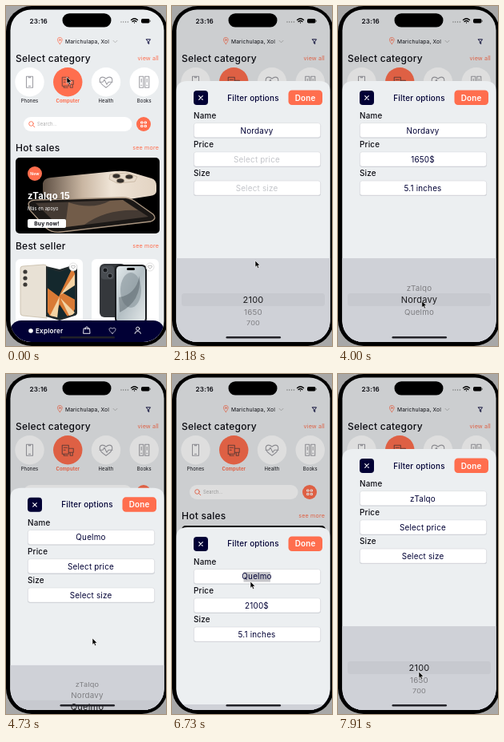
An HTML page that plays this animation: 200 by 426 pixels, repeating every 8000 ms.

```html
<!DOCTYPE html>
<html lang="en">
<head>
<meta charset="utf-8">
<title>Shop filter</title>
<style>
  html, body { margin: 0; width: 100%; height: 100%; overflow: hidden; background: #a8a8a8; }
  svg { display: block; width: 100%; height: 100%; }
  text { font-family: Inter, Roboto, sans-serif; fill: #0b0b12; letter-spacing: .02em; }
  .mid { text-anchor: middle; }
  .end { text-anchor: end; }
  .head { font-size: 12px; font-weight: 500; }
  .link { font-size: 7.2px; fill: #ff6e4e; }
  .cat { font-size: 5.9px; }
  .field { font-size: 9.9px; fill: #010035; }
  .label { font-size: 9.9px; font-weight: 500; }
  .line { fill: none; stroke-linecap: round; stroke-linejoin: round; }
</style>
</head>
<body>
<svg viewBox="0 0 200 426" preserveAspectRatio="none">
  <defs>
    <clipPath id="screen"><rect x="5.500" y="4.500" width="192" height="416.500" rx="26"/></clipPath>
    <clipPath id="banner"><rect x="12" y="190" width="180" height="95" rx="5"/></clipPath>
    <clipPath id="unfolded"><path d="M52 329l15 4v58l-15-4zM67 333l19-6v59l-19 5z"/></clipPath>
    <linearGradient id="gold">
      <stop offset="0" stop-color="#5f5044"/><stop offset=".35" stop-color="#c9b6a2"/>
      <stop offset=".6" stop-color="#efe4d6"/><stop offset="1" stop-color="#e2d3c2"/>
    </linearGradient>
    <linearGradient id="mist" x1="0" y1="0" x2="1" y2="1">
      <stop offset="0" stop-color="#e3eaec"/><stop offset=".5" stop-color="#b4bfc4"/>
      <stop offset="1" stop-color="#e4e9ea"/>
    </linearGradient>
    <path id="heart" d="M0 5 C-9 -1 -5 -6.5 0 -3 C5 -6.5 9 -1 0 5Z"/>
  </defs>
  <rect x="0" y="0" width="202" height="426" rx="32"/>
  <g clip-path="url(#screen)">
    <rect x="5" y="3" width="193" height="418" fill="#eaedef"/>

    <g class="line" stroke="#ff6e4e" stroke-width=".8">
      <path d="M67.300 47.500 C63 43 64 39.500 67.300 39.500 C70.600 39.500 71.600 43 67.300 47.500Z"/>
      <circle cx="67.300" cy="42.500" r="1"/>
    </g>
    <text x="74" y="46.500" font-size="6.700">Marichulapa, Xol</text>
    <path class="line" d="M134 43.300l2.500 2.500 2.500-2.500" stroke="#aaa" stroke-width=".8"/>
    <path class="line" d="M175.500 41.800h5l-1.800 2.700v3l-1.400-.9v-2.100z" stroke="#010035" stroke-width=".9"/>

    <text class="head" x="12" y="70">Select category</text>
    <text class="link end" x="191" y="68">view all</text>
    <g id="categories"></g>

    <rect x="22" y="139" width="135.500" height="18" rx="9" fill="#fff"/>
    <g class="line" stroke="#ff6e4e" stroke-width=".9"><circle cx="31.500" cy="147.500" r="2.800"/><path d="M33.500 149.500l2.300 2.300"/></g>
    <text x="39" y="150" font-size="5.700" style="fill:#aaa">Search...</text>
    <circle cx="172" cy="148" r="9" fill="#ff6e4e"/>
    <path class="line" d="M169 145h2v2h-2zM173.500 145h2v2h-2zM169 149.500h2v2h-2zM173.500 149.500h2v2h-2z" stroke="#fff"/>

    <text class="head" x="12" y="182">Hot sales</text>
    <text class="link end" x="191" y="180">see more</text>
    <g clip-path="url(#banner)">
      <rect x="12" y="190" width="180" height="95"/>
      <path d="M46 222 Q47 216 56 215 L136 207 Q146 206 155 208 L182 216 Q188 218 188 225 V232 Q188 237 180 238 L148 243 L54 241 Q45 239 46 230Z" fill="url(#gold)"/>
      <path d="M130 211l20-2 14 5-3 6-22 2-10-5z" fill="#e8dccd" stroke="#b9a58e" stroke-width=".6"/>
      <g fill="#35302c" stroke="#c4b29b" stroke-width=".8"><ellipse cx="138" cy="213" rx="5" ry="3"/><ellipse cx="154" cy="214" rx="5" ry="3"/><ellipse cx="143" cy="219" rx="5" ry="3"/></g>
      <path d="M28 248 Q29 243 38 243 L146 240 Q154 240 160 244 L184 261 Q189 267 181 270 L70 283 Q58 285 50 278 L30 256Z" fill="#1b1816" stroke="#a99580" stroke-width="1.300"/>
      <path d="M37 247 L146 243 L178 264 L68 278Z" fill="#443a33"/>
      <path d="M78 246 Q108 256 130 244 L146 243 L165 256 Q126 254 98 274 L74 277Z" fill="#927459" opacity=".6"/>
    </g>
    <circle cx="36" cy="210" r="9" fill="#ff6e4e"/>
    <text class="mid" x="36" y="212" font-size="5" font-weight="700" style="fill:#fff">New</text>
    <text x="27" y="241.500" font-size="11.300" font-weight="700" style="fill:#fff">zTalqo 15</text>
    <text x="27" y="256" font-size="5.600" style="fill:#fff">Más en apoyo</text>
    <rect x="27" y="267" width="48" height="11" rx="2" fill="#fff"/>
    <text class="mid" x="51" y="275" font-size="6.700" font-weight="700">Buy now!</text>

    <text class="head" x="12" y="305">Best seller</text>
    <text class="link end" x="191" y="303">see more</text>
    <rect x="12" y="317" width="84" height="110" rx="6" fill="#fff"/>
    <rect x="107" y="317" width="84" height="110" rx="6" fill="#fff"/>
    <path d="M18 329q0-3 3-3l26-2q4 0 4 3v64l-30-3q-3 0-3-4z" fill="#e8e1d5" stroke="#c7bba7" stroke-width=".8"/>
    <g fill="#3b3936"><circle cx="24" cy="333" r="2.600"/><circle cx="24" cy="341" r="2.600"/><circle cx="24" cy="349" r="2.600"/></g>
    <path d="M50 326l17 4 19-6q3 0 3 3v57q0 3-3 4l-19 6-17-5z" fill="#222a2c"/>
    <g clip-path="url(#unfolded)">
      <rect x="50" y="325" width="40" height="70" fill="#14282d"/>
      <path d="M66 364L50 352V380L58 394L67 374L80 394L90 370L70 359L88 340L83 328Z" fill="#d97a35"/>
      <path d="M67 364L54 390L64 392ZM68 362L89 348L86 336ZM68 366L80 390L86 384Z" fill="#f3d3a4"/>
    </g>
    <rect x="117" y="323" width="33" height="67" rx="6" fill="#35383c"/>
    <rect x="119" y="325.500" width="16" height="17" rx="4" fill="#484c51"/>
    <g fill="#15171a" stroke="#70757b" stroke-width=".8"><circle cx="124" cy="331" r="3"/><circle cx="130" cy="338" r="3"/></g>
    <rect x="136" y="324" width="40" height="74" rx="6" fill="#191b1e"/>
    <rect x="138" y="326" width="36" height="70" rx="4.500" fill="url(#mist)"/>
    <ellipse cx="156" cy="356" rx="13" ry="22" fill="#88959b" opacity=".6"/>
    <path d="M142 384q28-14 25-46q-5 24-26 27z" fill="#4f5960" opacity=".45"/>
    <rect x="151" y="328" width="10" height="3" rx="1.500"/>
    <g fill="#fff" stroke="#d5d5d5" stroke-width=".7">
      <circle cx="84" cy="327" r="5"/><circle cx="180" cy="327" r="5"/>
      <g fill="none" stroke="#999" stroke-width="1.500"><use href="#heart" transform="translate(84 327) scale(.45)"/><use href="#heart" transform="translate(180 327) scale(.45)"/></g>
    </g>
    <rect x="5" y="394" width="193" height="40" rx="14" fill="#010035"/>
    <circle cx="31" cy="407" r="2.800" fill="#fff"/>
    <text x="37" y="410" font-size="8.200" font-weight="600" style="fill:#fff">Explorer</text>
    <g class="line" stroke="#fff" stroke-width=".9">
      <path d="M97.500 404h7l.5 6.300h-8zM99.300 405v-2q1.700-2.600 3.400 0v2"/>
      <use href="#heart" transform="translate(133 406.500) scale(.75)"/>
      <circle cx="164.700" cy="404.300" r="2.100"/><path d="M161 410.500q0-3 3.700-3t3.700 3"/>
    </g>

    <text x="29.500" y="21.500" font-size="8.200" font-weight="600">23:16</text>
    <rect x="70.500" y="9.300" width="61" height="17.200" rx="8.600"/>
    <path class="line" d="M144 20h9" stroke="#777" stroke-width="1.300" stroke-dasharray="0 2.800"/>
    <path class="line" d="M156.500 17.500q4-3.500 8 0M158 19.500q2.500-2 5 0M160.500 21h.01" stroke="#000" stroke-width="1.300"/>
    <rect x="169" y="16" width="10.500" height="5.500" rx="1.700"/><path d="M180.300 17.800v2" stroke="#777"/>

    <rect id="dim" x="5" y="3" width="193" height="418"/>

    <g id="sheet">
      <path d="M5 14Q5 0 19 0H184Q198 0 198 14V330H5Z" fill="#eceff1"/>
      <rect x="27" y="12" width="18" height="18" rx="4" fill="#010035"/>
      <path class="line" d="M33.700 18.700l4.600 4.600m0-4.600l-4.600 4.600" stroke="#fff" stroke-width="1.100"/>
      <text class="mid label" x="101.500" y="24.500" style="fill:#010035">Filter options</text>
      <rect x="145.500" y="11.500" width="42.500" height="18.500" rx="4.500" fill="#ff6e4e"/>
      <text class="mid" x="166.700" y="24.500" font-size="9.900" font-weight="600" style="fill:#fff">Done</text>
      <g id="fields"></g>
      <rect x="5" y="222" width="193" height="110" fill="#cfd1d7"/>
      <rect x="12" y="266" width="179" height="16" rx="3.500" fill="#c7c9cf"/>
      <g id="wheel"></g>
    </g>
    <rect x="67.500" y="414" width="68.500" height="2.400" rx="1.200" fill="#222228"/>
  </g>
  <path id="cursor" d="M0 0V8.200L1.900 6.500L3.200 9.500L4.700 8.800L3.400 6H6Z" stroke="#fff" stroke-width=".6"/>
</svg>
<script>
const LOOP = 8000, SLIDE = 260;
const SHEET_OPEN = 830, SHEET_LOW = 199, SHEET_HIGH = 94, OFFSCREEN = 421;
const $ = id => document.getElementById(id);
const clamp = v => Math.min(1, Math.max(0, v));
const ease = (t, start, length) => {
  const u = clamp((t - start) / length);
  return u * u * (3 - 2 * u);
};
const mix = (a, b, u) => a + (b - a) * u;

const icons = [
  'M-4 -7h8v14h-8zM-1 -7v1.5h2v-1.5M-1 5h2',
  'M-7 -6h8v11h-8zM-5 5v2h5M1 -2h6v5h-6zM3 3v4h3v-4M-5 -3h4M-5 0h2',
  'M0 7C-14 -2 -6 -10 0 -4C6 -10 14 -2 0 7M-8 0h4l2-3 3 6 2-3h5',
  'M-6 -7h5v14h-5zM1 -7h5v14h-5zM-3.5 -4v4M3.500 -4v4M-4 4h1M3 4h1'
];
$('categories').innerHTML = ['Phones', 'Computer', 'Health', 'Books'].map((name, i) => {
  const on = i === 1, x = 29.5 + 47.75 * i;
  return `<circle cx="${x}" cy="95.2" r="18.2" fill="${on ? '#ff6e4e' : '#fff'}"/>
    <path class="line" d="${icons[i]}" transform="translate(${x} 95.2)" stroke="${on ? '#78463c' : '#a0a0a6'}" stroke-width="1.1"/>
    <text class="cat mid" x="${x}" y="121.3" style="${on ? 'fill:#ff6e4e;font-weight:700' : ''}">${name}</text>`;
}).join('');

const fields = [
  { label: 'Name', items: ['zTalqo', 'Nordavy', 'Quelmo'], unit: '' },
  { label: 'Price', items: ['2100', '1650', '700'], unit: '$' },
  { label: 'Size', items: ['5.1', '6.5'], unit: ' inches' }
];
$('fields').innerHTML = fields.map((f, i) => {
  const y = 36.2 * i;
  return `<text class="label" x="27" y="${y + 47}">${f.label}</text>
    <rect x="27" y="${y + 53.3}" width="159" height="18.3" rx="3" fill="#c9ccd2"/>
    <rect x="27.3" y="${y + 52.6}" width="158.4" height="18.2" rx="3" fill="#fff" stroke="#d3d6da" stroke-width=".6"/>
    ${i ? '' : '<rect id="selection" x="89.5" y="56" width="33.5" height="12.5" fill="#c6c6ca"/>'}
    <text class="field mid" id="value${i}" x="106" y="${y + 65.5}"></text>`;
}).join('');
$('wheel').innerHTML = '<text class="mid"></text>'.repeat(3);
const wheelItems = [...$('wheel').children];

// Picker visits: open time, close time, field, first row, last row, scroll start
const visits = [
  [1250, 1700, 0, 0, 1, 1470],
  [1910, 2500, 1, 0, 1, 2240],
  [2760, 3420, 2, 0, 0, 3200],
  [3720, 4607, 0, 1, 2, 4080],
  [4950, 5450, 1, 0, 0, 5200],
  [5860, 6320, 2, 0, 0, 6100],
  [6690, 7350, 0, 2, 0, 7000],
  [7600, 9000, 1, 0, 0, 8500]
];

// Pointer stops: time, x, y
const stops = [
  [150, 76, 89], [680, 177, 43], [860, 177, 43], [1180, 105, 260], [1300, 105, 260],
  [1480, 105, 375], [1660, 105, 350], [1900, 104, 297], [2180, 104, 319], [2400, 104, 362],
  [2740, 105, 331], [3180, 105, 355], [3680, 103, 260], [4080, 105, 382], [4380, 107, 350],
  [4730, 108, 331], [4940, 106, 297], [5250, 106, 364], [5620, 107, 328], [5860, 107, 328],
  [6120, 106, 362], [6580, 98, 260], [6760, 98, 260], [7020, 100, 358], [7240, 101, 390],
  [7580, 102, 296], [7880, 101, 373]
];

function pointerAt(t) {
  const next = stops.findIndex(s => s[0] > t);
  if (next <= 0) return next ? stops.at(-1).slice(1) : stops[0].slice(1);
  const [a, b] = [stops[next - 1], stops[next]];
  const u = ease(t, a[0], b[0] - a[0]);
  return [mix(a[1], b[1], u), mix(a[2], b[2], u)];
}

function valuesAt(t) {
  const values = fields.map(f => 'Select ' + f.label.toLowerCase());
  const muted = [true, true, true];
  let names = 0;
  for (const [, close, index, , row] of visits) {
    if (t < close - 100) break;
    values[index] = fields[index].items[row] + fields[index].unit;
    muted[index] = false;
    // A later change of name resets the other two fields
    if (index === 0 && names++) {
      values[1] = 'Select price';
      values[2] = 'Select size';
      muted.fill(false);
    }
  }
  return { values, muted };
}

function drawWheel(t) {
  const [, , index, from, to, scroll] = visits.findLast(v => t >= v[0]) || visits[0];
  const position = mix(from, to, ease(t, scroll, 220));
  wheelItems.forEach((el, i) => {
    const away = i - position, angle = away * .3, near = clamp(1 - Math.abs(away));
    const shade = Math.round(mix(125, 28, near));
    el.textContent = fields[index].items[i] ?? '';
    el.setAttribute('transform', `translate(101.5 ${274 + 50 * Math.sin(angle)}) scale(1 ${Math.cos(angle)})`);
    el.setAttribute('y', 4);
    el.setAttribute('font-size', mix(9.8, 11, near) - Math.max(0, Math.abs(away) - 1) * .6);
    el.style.fill = `rgb(${shade},${shade},${shade + 3})`;
  });
}

function draw(t) {
  const shown = ease(t, SHEET_OPEN, SLIDE);
  const lift = visits.reduce((sum, v) => sum + ease(t, v[0], SLIDE) - ease(t, v[1], SLIDE), 0);
  const top = mix(OFFSCREEN, SHEET_LOW, shown) + (SHEET_HIGH - SHEET_LOW) * lift;
  $('sheet').setAttribute('transform', `translate(0 ${top})`);
  $('dim').setAttribute('opacity', .13 * shown);

  const { values, muted } = valuesAt(t);
  values.forEach((value, i) => {
    const el = $('value' + i);
    el.textContent = value;
    el.style.fill = muted[i] ? '#c3c5ca' : '#010035';
  });
  $('selection').setAttribute('opacity', t > 6650 && t < 6950 ? 1 : 0);
  drawWheel(t);
  $('cursor').setAttribute('transform', `translate(${pointerAt(t)})`);
}

const began = performance.now();
function tick() {
  draw((performance.now() - began) % LOOP);
  requestAnimationFrame(tick);
}
tick();
</script>
</body>
</html>
```
